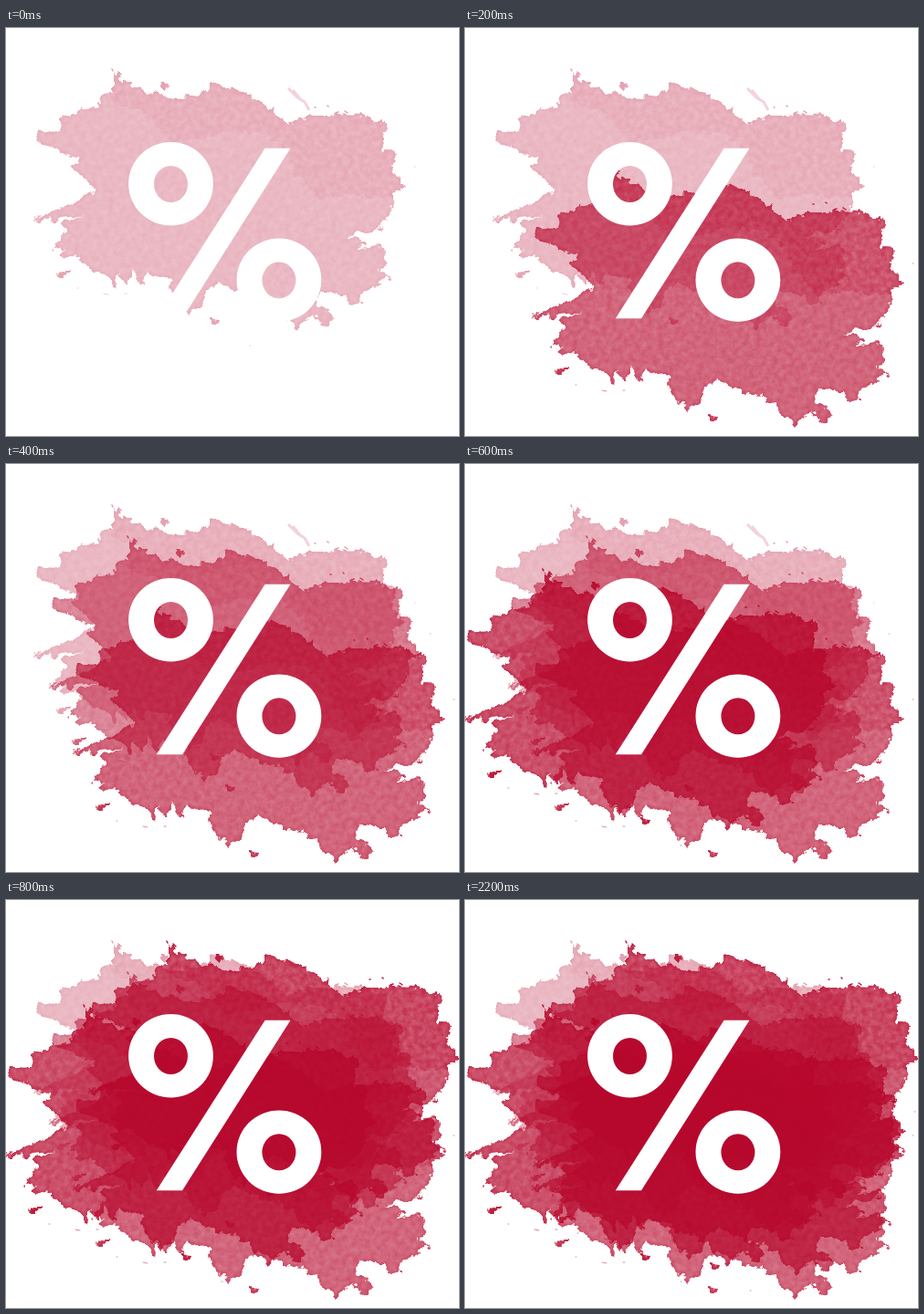
These frames come from a looping animation (496 by 447 pixels, 3 s). An HTML page:

```html
<!DOCTYPE html>
<html lang="en">
<head>
<meta charset="utf-8">
<title>Percent on watercolour</title>
<style>
  html, body { margin: 0; width: 100%; height: 100%; overflow: hidden; background: #fff; }
  svg { display: block; width: 496px; height: 447px; }
</style>
</head>
<body>
<svg viewBox="0 0 496 447">
  <defs>
    <filter id="paint" filterUnits="userSpaceOnUse" x="0" y="20" width="480" height="345"
            color-interpolation-filters="sRGB">
      <!-- ragged outline; opaque noise keeps the displacement centred -->
      <feTurbulence type="fractalNoise" baseFrequency=".1" numOctaves="3" seed="4"/>
      <feColorMatrix values="1 0 0 0 0  0 1 0 0 0  0 0 1 0 0  0 0 0 0 1" result="rough"/>
      <feDisplacementMap in="SourceGraphic" in2="rough" scale="13"
                         xChannelSelector="R" yChannelSelector="G" result="shape"/>
      <!-- paper grain -->
      <feTurbulence type="fractalNoise" baseFrequency=".16" numOctaves="4" seed="9"/>
      <feColorMatrix values="0 0 0 0 0  0 0 0 0 0  0 0 0 0 0  .36 0 0 0 .66" result="grain"/>
      <feComposite in="shape" in2="grain" operator="in" result="wash"/>
      <!-- pigment gathered at the rim -->
      <feGaussianBlur in="shape" stdDeviation="2" result="soft"/>
      <feComposite in="shape" in2="soft" operator="out" result="rim"/>
      <feMerge>
        <feMergeNode in="wash"/>
        <feMergeNode in="rim"/>
      </feMerge>
    </filter>

    <path id="outline" d="M30 115 62 113 57 99 84 90 103 86 100 76 118 70 118 49 133 60
      165 73 182 77 218 72 226 60 255 69 281 82 306 103 345 95 385 96 417 103
      412 135 428 136 422 155 435 174 424 182 423 200 408 222 372 228 395 234 386 241
      413 239 416 258 408 268 421 272 390 290 388 303 374 302 370 290 345 290 340 300
      360 318 345 325 335 313 318 332 296 305 268 293 236 282 220 286 212 302 201 313
      182 296 180 278 155 270 150 282 140 264 132 280 124 268 120 284 105 268
      90 262 82 252 58 250 63 240 52 242 65 225 60 214 85 205
      28 212 78 190 99 176 72 152 82 145 33 122Z"/>
    <clipPath id="inside"><use href="#outline"/></clipPath>

    <g id="blot" fill="#b7082d">
      <g filter="url(#paint)">
        <use href="#outline" fill-opacity=".77"/>
        <path clip-path="url(#inside)" fill-opacity=".65" d="M105 40 120 82 150 92 168 112 184 124
          215 122 245 112 285 116 308 134 320 166 345 188 380 182 440 190 440 80 300 50Z"/>
        <path d="M170 58l7 1-2 8-6-3ZM57 270l9-7 6 2-9 7ZM224 319l8 1-3 6-5-1Z"/>
      </g>
      <g fill="none" stroke="#b7082d" stroke-linecap="round">
        <path d="M116 45l1 2m6 1l3 3M338 87l1 0m13-2l1 1m8 7l3-1m7-1l3 2" stroke-width="1.5"/>
        <path d="M107 291l5 1m18-1l2 0M78 285l1 0M447 152l1 0M267 348l1 0" stroke-opacity=".5"/>
      </g>
    </g>
  </defs>

  <path d="M309 66l10 10 8 5 5 9M314 68l9 11" fill="none" stroke="#f3d3dc" stroke-width="3"/>
  <g id="layers"></g>

  <g fill="#fff" fill-rule="evenodd">
    <path id="ring" d="M134.1 170.8a46.4 45.7 0 0 1 92.8 0a46.4 45.7 0 0 1-92.8 0Z
      M162 171a18.5 20 0 0 0 37 0a18.5 20 0 0 0-37 0Z"/>
    <use href="#ring" x="118.4" y="105.3"/>
    <path d="M283.6 131.8H311.5L193 318.3H164.8Z"/>
  </g>
</svg>
<script>
  const LOOP = 3000, STEP = 200;
  // x, y, opacity of each wash
  const washes = [[0, 0, .4], [43, 106, .88], [17, 34, .68], [-31, 70, 1], [60, 0, .95], [45, 80, .95]];
  const layers = document.getElementById('layers');

  const blots = washes.map(([x, y, opacity]) => {
    const blot = document.createElementNS('http://www.w3.org/2000/svg', 'use');
    const attrs = { href: '#blot', x, y, opacity };
    for (const name in attrs) blot.setAttribute(name, attrs[name]);
    return layers.appendChild(blot);
  });

  function draw() {
    const time = performance.now() % LOOP;
    blots.forEach((blot, i) => {
      blot.style.visibility = time >= i * STEP ? 'visible' : 'hidden';
    });
    requestAnimationFrame(draw);
  }
  draw();
</script>
</body>
</html>
```
